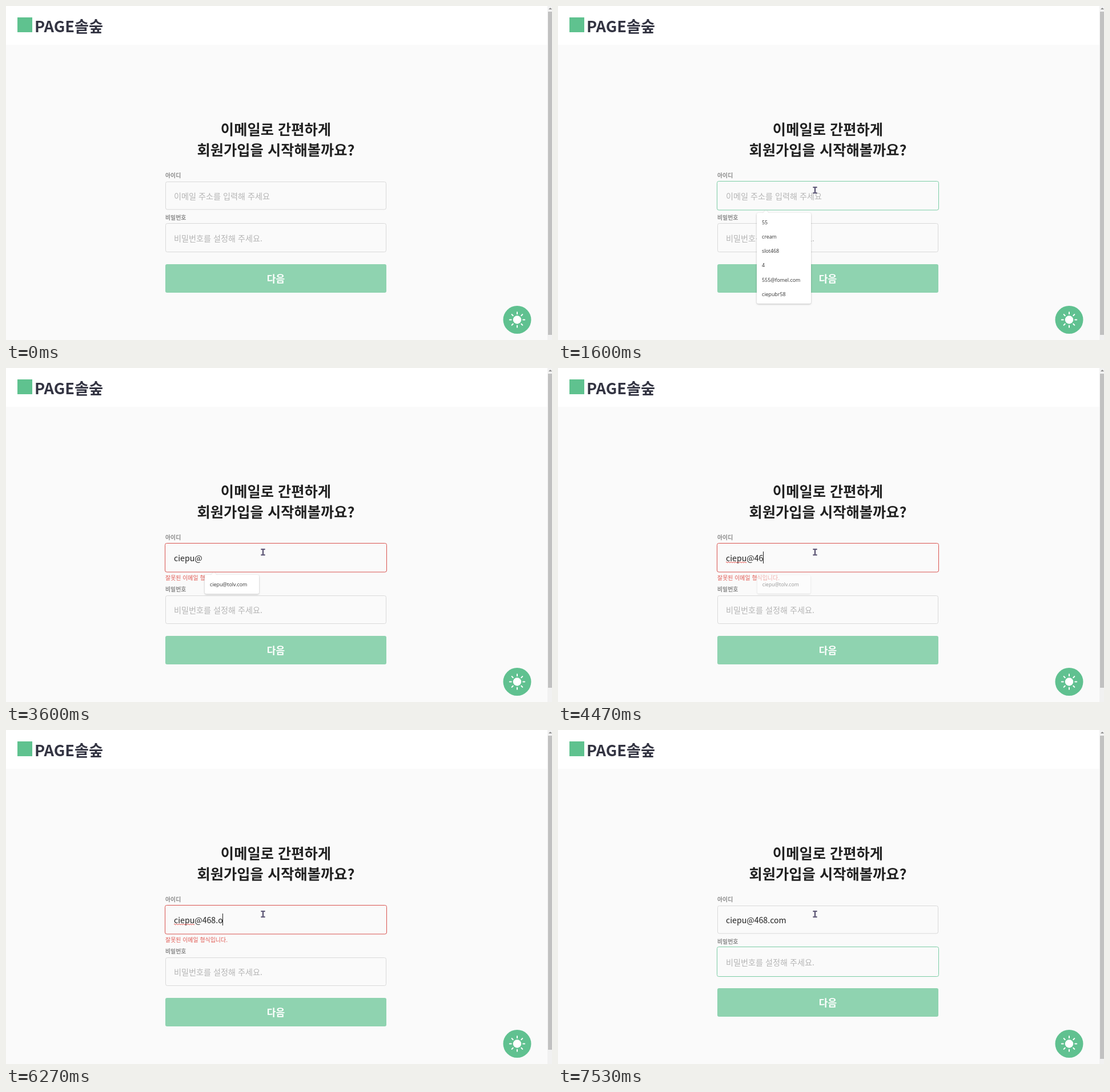
Recreate the animation shown at these times as an HTML page. Size 956 by 586 pixels, loop 8 s.

```html
<!DOCTYPE html>
<html lang="ko">
<head>
<meta charset="utf-8">
<title>회원가입</title>
<style>
  html, body { margin: 0; width: 100%; height: 100%; overflow: hidden; background: #fafafa; }
  svg { display: block; width: 100%; height: 100%; }
  text { font-family: 'Noto Sans CJK KR', 'Noto Sans CJK JP', 'Noto Sans CJK', sans-serif; white-space: pre; }
  .title { font-size: 25.3px; font-weight: 700; fill: #212121; text-anchor: middle; }
  .label { font-size: 9.9px; font-weight: 700; fill: #8a8a8a; }
  .input { font-size: 14.15px; fill: #212121; }
  .hint { fill: #b5b5b5; }
  .field { fill: none; }
  #popup { filter: drop-shadow(0 1px 1.5px rgba(0, 0, 0, .25)); }
  #popup text { font: 8.9px 'Open Sans', 'Noto Sans', sans-serif; fill: #333; }
</style>
</head>
<body>
<svg viewBox="0 0 956 586">
  <rect width="956" height="586" fill="#fafafa"/>
  <rect width="948" height="68" fill="#fff"/>
  <rect x="20" y="20" width="26" height="26" fill="#5fc28f"/>
  <text x="50" y="45.5" font-size="27.2" font-weight="900" fill="#333442">PAGE솔숲</text>

  <text class="title" x="472.5" y="226">이메일로 간편하게</text>
  <text class="title" x="472.5" y="262">회원가입을 시작해볼까요?</text>

  <text class="label" x="279" y="301">아이디</text>
  <rect class="field" id="emailBox" rx="3"/>
  <text class="input hint" id="emailHint" x="294" y="339">이메일 주소를 입력해 주세요</text>
  <text class="input" id="email" x="294" y="339"></text>
  <path id="squiggle" fill="none" stroke="#e0403a" stroke-width=".9"/>
  <text id="error" x="279" y="372" font-size="9.95" fill="#e0564f">잘못된 이메일 형식입니다.</text>

  <g id="lower">
    <text class="label" x="279" y="375">비밀번호</text>
    <rect class="field" id="passwordBox" rx="3"/>
    <text class="input hint" x="294" y="413">비밀번호를 설정해 주세요.</text>
    <rect x="279" y="453" width="387" height="50" rx="3" fill="#8fd3b0"/>
    <text x="472.5" y="485" font-size="17" font-weight="700" fill="#fff" text-anchor="middle">다음</text>
  </g>
  <rect id="caret" width="1" height="21" fill="#212121"/>

  <circle cx="895" cy="550.5" r="24.5" fill="#60c190"/>
  <circle cx="895" cy="550.5" r="7.2" fill="#fff"/>
  <g id="rays" stroke="#fff" stroke-width="2" stroke-linecap="round"></g>

  <rect x="948" width="8" height="586" fill="#f1f1f1"/>
  <path d="M950 6l3-3 3 3z" fill="#8a8a8a"/>
  <rect id="thumb" x="949" y="10" width="7" fill="#c1c1c1"/>

  <g id="popup">
    <path d="M358 364l6-5.5 6 5.5z" fill="#fff"/>
    <rect id="popupBox" x="348" y="363" fill="#fff"/>
    <g id="items"></g>
  </g>

  <g id="cursor">
    <path id="arrow" d="M0 0V15L3.5 11.8 6 17.5 8.4 16.4 6 11H10.6Z" fill="#fff" stroke="#222" stroke-width=".9"/>
    <g id="beam" fill="none">
      <path d="M-3.5-5H3.5M0-5V5M-3.5 5H3.5" stroke="#37304f" stroke-width="2.2"/>
      <path d="M-3-5H3M0-5V5M-3 5H3" stroke="#b9b4d6" stroke-width=".5"/>
    </g>
  </g>
</svg>
<script>
const LOOP = 8000, TICK = 200 / 3;
const $ = id => document.getElementById(id);
const set = (id, attrs) => { for (const k in attrs) $(id).setAttribute(k, attrs[k]); };
const show = (id, on) => set(id, { visibility: on ? 'visible' : 'hidden' });
const clamp = v => Math.max(0, Math.min(1, v));
const mix = (a, b, p) => a + (b - a) * p;
const between = (t, a, b) => t >= a && t < b;
const latest = (steps, t) => steps.filter(s => s[0] <= t).pop()[1];

const typing = [
  [0, ''], [1870, 'c'], [2070, 'ci'], [2330, 'cie'], [2400, 'ciepu'], [3070, 'ciepu@'],
  [4330, 'ciepu@4'], [4400, 'ciepu@46'], [5130, 'ciepu@468'], [5400, 'ciepu@468.'],
  [5730, 'ciepu@468.o'], [5800, 'ciepu@468.oc'], [6270, 'ciepu@468.o'], [6330, 'ciepu@468.'],
  [6600, 'ciepu@468.c'], [6670, 'ciepu@468.co'], [6800, 'ciepu@468.com']
];
const caretOff = [[0, 1000], [1600, 1870], [2870, 3070], [3600, 4130], [4930, 5130], [7530, LOOP]];

const history = ['ciepubr58', 'ciepu@tolv.com', 'ciepu57@fomel.com', 'ciel468', 'cinol@fomel.com'];
const suggestions = [
  [0, { width: 95, items: ['55', 'cream', 'slot468', '4', '555@fomel.com', 'ciepubr58'] }],
  [1870, { width: 120, items: ['cream', ...history] }],
  [2070, { width: 120, items: [...history, 'cirun57'] }],
  [2330, { width: 98, height: 37, square: true, items: ['ciepubr58'] }],
  [2400, { width: 95, items: ['ciepu@tolv.com'] }]
];

$('rays').innerHTML = Array.from({ length: 8 }, (_, i) =>
  `<path d="M10.3 0H13.2" transform="translate(895 550.5) rotate(${i * 45})"/>`).join('');

// An active field's border sits one pixel outside the idle one.
function drawField(id, y, height, color) {
  const inset = color ? -.5 : .5;
  set(id, {
    x: 279 + inset, y: y + inset, width: 387 - 2 * inset, height: height - 2 * inset,
    stroke: color || '#d9d9d9'
  });
}

function drawForm(t) {
  const value = latest(typing, t);
  const invalid = value !== '' && !/\.\w{2,}$/.test(value);
  const onPassword = t >= 7000, onEmail = t >= 1000 && !onPassword;

  $('email').textContent = value;
  show('emailHint', !value);
  show('error', invalid);
  drawField('emailBox', 308, 49.5, invalid ? '#d9534f' : onEmail && '#7bcda5');
  drawField('passwordBox', invalid ? 382 : 381, invalid ? 50 : 51, onPassword && '#7bcda5');
  set('lower', { transform: `translate(0 ${invalid ? 17 : 0})` });
  set('thumb', { height: invalid ? 551 : 567 });

  const textWidth = value ? $('email').getComputedTextLength() : 0;
  set('caret', onPassword ? { x: 294, y: 397 } : { x: Math.round(293.6 + textWidth), y: 322 });
  show('caret', !caretOff.some(([a, b]) => between(t, a, b)));

  const marked = between(t, 4070, 7000);
  show('squiggle', marked);
  if (marked) {
    const waves = Math.round($('email').getSubStringLength(0, 5) / 4);
    set('squiggle', { d: 'M294 341' + 'q1-2 2 0t2 0'.repeat(waves) });
  }
}

function drawPopup(t, tick) {
  const fade = clamp((tick - 4330) / 270);
  const opacity = t < 2000 ? clamp((tick - 1000) / 260) : 1 - fade;
  show('popup', opacity > 0);
  if (!opacity) return;
  const { width, height, square, items } = latest(suggestions, t);
  set('popupBox', { width, height: height || 8 + 25.2 * items.length, rx: square ? 0 : 3 });
  $('items').innerHTML = items.map((s, i) => `<text x="357" y="${382.8 + i * 25.2}">${s}</text>`).join('');
  set('popup', {
    opacity,
    transform: `translate(395.5 379.5) scale(${1 - .04 * fade}) translate(-395.5 -379.5)`
  });
}

function drawCursor(t, tick) {
  const out = clamp((tick - 130) / 470), back = clamp((tick - 600) / 330);
  const ease = p => p * p * (3 - 2 * p);
  const x = mix(mix(84, 515, ease(out)), 450, ease(back));
  const y = mix(mix(269, 330, ease(out)), 323, ease(back));
  const overField = x > 279 && y > 308;
  show('cursor', t >= 130);
  set('cursor', { transform: `translate(${x} ${y})` });
  set('arrow', { opacity: overField ? 0 : 1 });
  set('beam', { opacity: overField ? 1 : 0 });
}

function frame(now) {
  const t = now % LOOP;
  const tick = Math.floor((t + 4) / TICK) * TICK;
  drawForm(t);
  drawPopup(t, tick);
  drawCursor(t, tick);
  requestAnimationFrame(frame);
}
requestAnimationFrame(frame);
</script>
</body>
</html>
```
